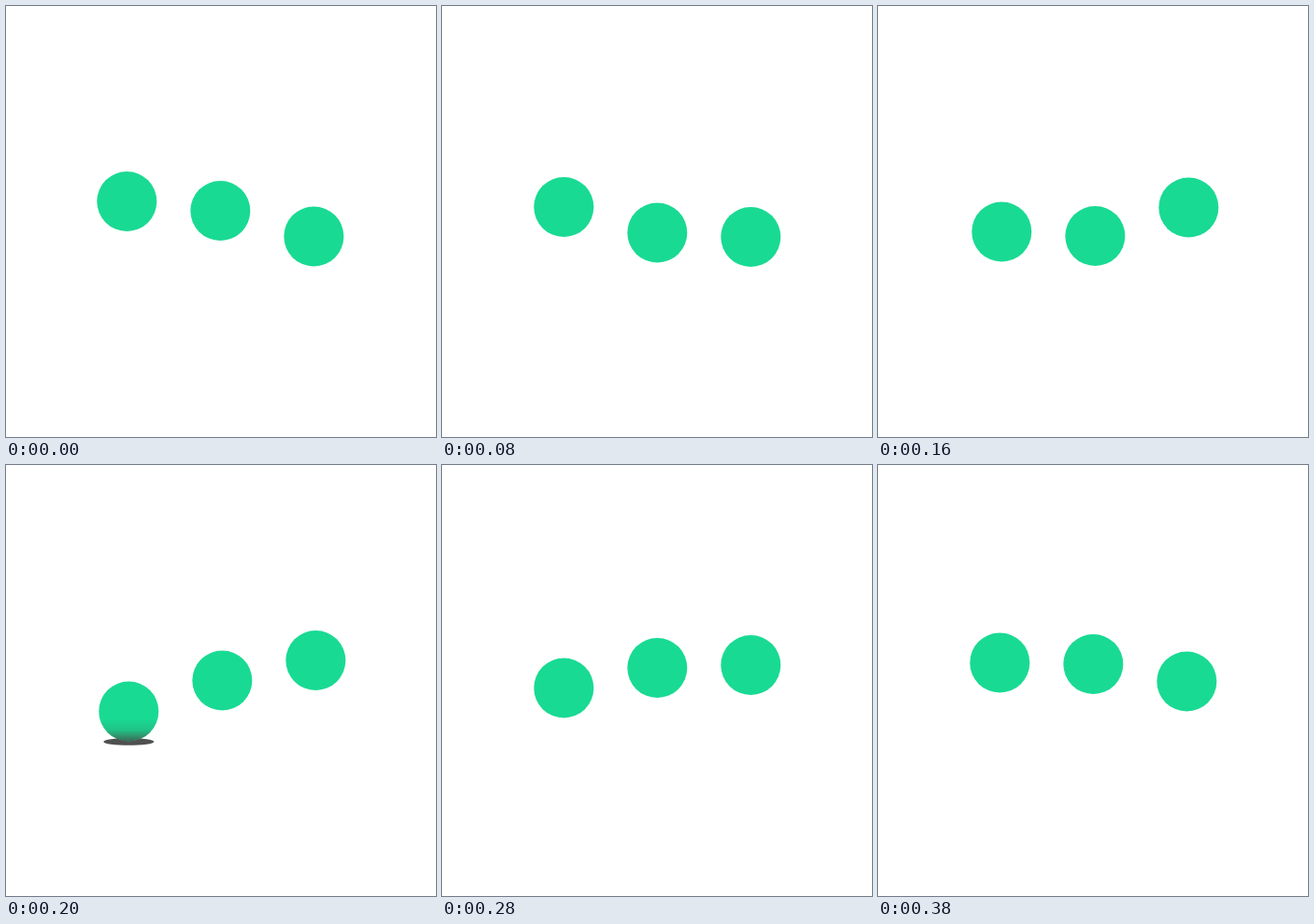
Animation, 460 px wide and 461 px high, one loop 0.4 s. Source, as an HTML page with a canvas:

```html
<!DOCTYPE html>
<html lang="en">
<head>
<meta charset="utf-8">
<title>Bouncing dots</title>
<style>
  html, body { margin: 0; width: 100%; height: 100%; overflow: hidden; background: #fff; }
  canvas { display: block; }
</style>
</head>
<body>
<canvas id="stage" width="460" height="461"></canvas>
<script>
const ctx = document.getElementById("stage").getContext("2d");
const LOOP = 400, STEP = 20, RADIUS = 32, FLOOR = 264;
const GREEN = "#19da93";

// Height keys [ms, y] of each ball; a ball bounces sharply at its `hit` time.
const balls = [
  { x: 0, hit: 200, keys: [[0, 209], [80, 215], [160, 241.5], [200, 263.5], [280, 238.5], [340, 221], [380, 211.5]] },
  { x: 100, hit: 120, keys: [[0, 219], [80, 242.5], [120, FLOOR], [160, 246], [200, 230.5], [280, 217], [340, 213], [380, 213]] },
  { x: 200, hit: 40, keys: [[0, 246.5], [40, FLOOR], [80, 247], [160, 215.5], [200, 209], [280, 214], [340, 223], [380, 231.5]] }
];
const sway = [[0, 129.3], [80, 130.3], [160, 132.3], [200, 131.3], [280, 130.3], [400, 130.3]];

const slope = (a, b) => (b[1] - a[1]) / (b[0] - a[0]);

function keyAt(keys, i) {
  const n = keys.length, turn = Math.floor(i / n);
  const [t, y] = keys[i - turn * n];
  return [t + turn * LOOP, y];
}

function heightAt({ keys, hit }, t) {
  const i = keys.findLastIndex(k => k[0] <= t);
  const [before, a, b, after] = [-1, 0, 1, 2].map(d => keyAt(keys, i + d));
  const span = b[0] - a[0];
  const startSlope = a[0] === hit ? slope(a, b) : slope(before, b);
  const endSlope = b[0] === hit ? slope(a, b) : slope(a, after);
  const u = (t - a[0]) / span, v = 1 - u;
  return a[1] * v * v * (1 + 2 * u) + b[1] * u * u * (3 - 2 * u)
    + span * u * v * (startSlope * v - endSlope * u);
}

function swayAt(t) {
  const i = sway.findLastIndex(k => k[0] <= t);
  return sway[i][1] + slope(sway[i], sway[i + 1]) * (t - sway[i][0]);
}

function drawBall(x, y) {
  const near = Math.min(1, Math.max(0, (y - 253) / 10));
  if (near > 0) {
    ctx.fillStyle = `rgba(80, 80, 80, ${near})`;
    ctx.beginPath();
    ctx.ellipse(x, 296, 27, 3.8, 0, 0, Math.PI * 2);
    ctx.fill();
  }
  ctx.beginPath();
  ctx.arc(x, y, RADIUS, 0, Math.PI * 2);
  ctx.fillStyle = GREEN;
  ctx.fill();
  if (near > 0) {
    const shade = ctx.createLinearGradient(0, y + 8, 0, y + RADIUS);
    shade.addColorStop(0, "rgba(70, 75, 72, 0)");
    shade.addColorStop(0.5, `rgba(70, 75, 72, ${0.17 * near})`);
    shade.addColorStop(1, `rgba(70, 75, 72, ${0.8 * near})`);
    ctx.fillStyle = shade;
    ctx.fill();
  }
}

function render(now) {
  const t = Math.floor((now % LOOP) / STEP) * STEP;
  ctx.fillStyle = "#fff";
  ctx.fillRect(0, 0, 460, 461);
  const left = swayAt(t);
  for (const ball of balls) drawBall(left + ball.x, heightAt(ball, t));
}

const start = performance.now();
function tick() {
  render(performance.now() - start);
  requestAnimationFrame(tick);
}
tick();
</script>
</body>
</html>
```
